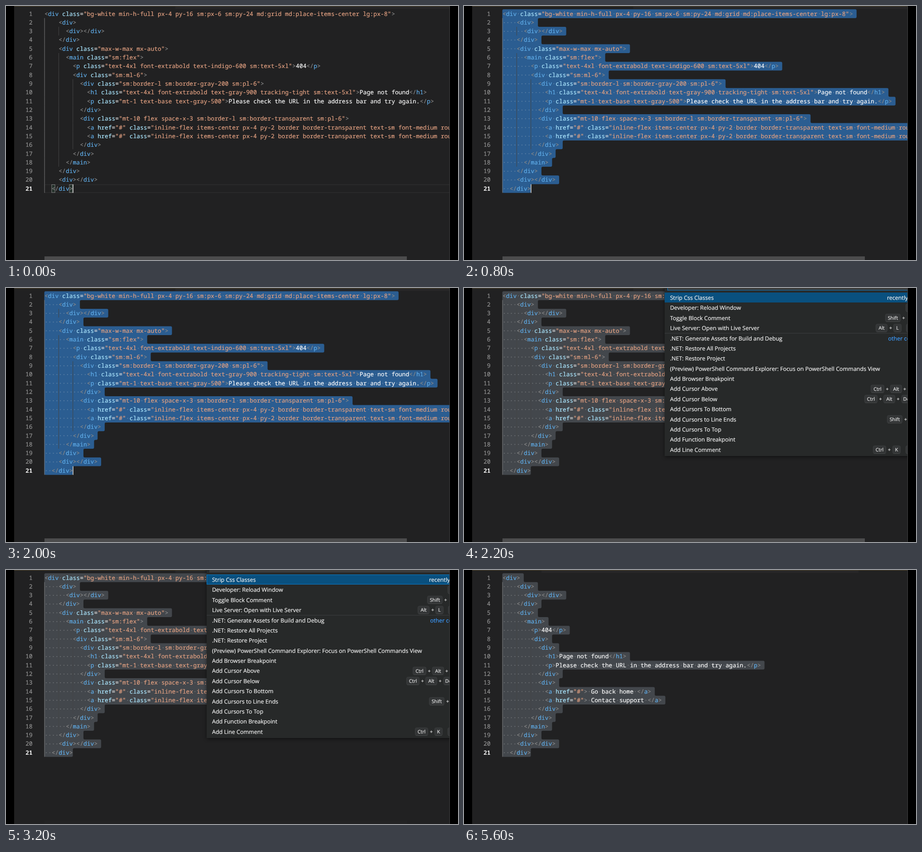
Recreate the animation shown at these times as an HTML page. Size 998x561 px, loop 5.8 s.

```html
<!DOCTYPE html>
<html lang="en">
<head>
<meta charset="utf-8">
<title>Strip classes in an editor</title>
<style>
  html, body { margin: 0; width: 100%; height: 100%; overflow: hidden; background: #000; }
  svg { display: block; width: 998px; height: 561px; }
  text {
    text-rendering: geometricPrecision; white-space: pre;
    fill: currentColor; stroke: currentColor; stroke-width: 0.22px;
  }
  .code { font: 13.03px "Noto Sans Mono", "DejaVu Sans Mono", monospace; font-variant-ligatures: none; }
  .menu { font: 12.5px "Open Sans", "Noto Sans", sans-serif; color: #f4f4f4; }
  .key { font-size: 10.7px; color: #e6e6e6; }
  .punct { color: #8a8a8a; }
  .tag { color: #60ade9; }
  .attr { color: #abe6ff; }
  .eq { color: #e4e4e4; }
  .str { color: #e2a081; }
  .plain { color: #fafafa; }
  .num { color: #929292; text-anchor: end; }
  .num.on { color: #f4f4f4; font-weight: 700; stroke: none; }
</style>
</head>
<body>
<svg id="stage" viewBox="0 0 998 561">
  <defs>
    <clipPath id="pane"><rect x="18" y="0" width="961.5" height="561"/></clipPath>
    <filter id="soft" x="-10%" y="-10%" width="120%" height="120%"><feGaussianBlur stdDeviation="4"/></filter>
  </defs>
</svg>
<script>
const LOOP = 5800;
const LEFT = 85, TOP = 7.35, CELL = 7.818, ROW = 19.31;

const button = 'inline-flex items-center px-4 py-2 border border-transparent text-sm font-medium rounded-md shadow-sm';
const markup = `<div class="bg-white min-h-full px-4 py-16 sm:px-6 sm:py-24 md:grid md:place-items-center lg:px-8">
    <div>
      <div></div>
    </div>
    <div class="max-w-max mx-auto">
      <main class="sm:flex">
        <p class="text-4xl font-extrabold text-indigo-600 sm:text-5xl">404</p>
        <div class="sm:ml-6">
          <div class="sm:border-l sm:border-gray-200 sm:pl-6">
            <h1 class="text-4xl font-extrabold text-gray-900 tracking-tight sm:text-5xl">Page not found</h1>
            <p class="mt-1 text-base text-gray-500">Please check the URL in the address bar and try again.</p>
          </div>
          <div class="mt-10 flex space-x-3 sm:border-l sm:border-transparent sm:pl-6">
            <a href="#" class="${button}"> Go back home </a>
            <a href="#" class="${button}"> Contact support </a>
          </div>
        </div>
      </main>
    </div>
    <div></div>
  </div>`;
const stripped = markup.replace(/ class="[^"]*"/g, '');

function el(parent, tag, attrs = {}, text) {
  const node = document.createElementNS('http://www.w3.org/2000/svg', tag);
  for (const k in attrs) node.setAttribute(k, attrs[k]);
  if (text !== undefined) node.textContent = text;
  parent.append(node);
  return node;
}
const rect = (parent, x, y, width, height, fill, more) =>
  el(parent, 'rect', { x, y, width, height, fill, ...more });
const show = (node, on) => node.setAttribute('visibility', on ? 'visible' : 'hidden');

const colX = c => LEFT + c * CELL;
const rowY = r => TOP + r * ROW;
const baseY = r => rowY(r) + 14.2;

// Closed outline with every corner rounded, inward ones too.
function roundPath(points, radius) {
  const toward = (a, b) => {
    const len = Math.hypot(b[0] - a[0], b[1] - a[1]);
    const k = Math.min(radius, len / 2) / len;
    return [a[0] + (b[0] - a[0]) * k, a[1] + (b[1] - a[1]) * k];
  };
  const n = points.length;
  return points.map((p, i) => {
    const a = toward(p, points[(i + n - 1) % n]);
    const b = toward(p, points[(i + 1) % n]);
    return `${i ? 'L' : 'M'}${a}Q${p} ${b}`;
  }).join('') + 'Z';
}

function selectionPath(lines) {
  const last = lines.length - 1;
  const left = LEFT - 0.4;
  const ends = lines.map((s, i) => colX(s.length + (i < last ? 1 : 0)));
  const pts = [[left, rowY(0)], [ends[0], rowY(0)]];
  for (let i = 0; i < last; i++) {
    if (Math.abs(ends[i] - ends[i + 1]) < 0.1 || Math.min(ends[i], ends[i + 1]) > 990) continue;
    pts.push([ends[i], rowY(i + 1)], [ends[i + 1], rowY(i + 1)]);
  }
  pts.push([ends[last], rowY(last + 1)], [left, rowY(last + 1)]);
  return roundPath(pts, 3);
}

function drawLine(parent, line, row) {
  const put = (kind, text, at) =>
    el(parent, 'text', { class: kind, x: colX(at), y: baseY(row) }, text);
  const parts = /(<\/?)(\w+)|(\w+)(=)("[^"]*")|(>)|([^<>\s]+)/g;
  const kinds = ['punct', 'tag', 'attr', 'eq', 'str', 'punct', 'plain'];
  for (const m of line.matchAll(parts)) {
    let at = m.index;
    m.slice(1).forEach((text, i) => {
      if (!text) return;
      put(kinds[i], text, at);
      at += text.length;
    });
  }
}

function buildCode(parent, source) {
  const lines = source.split('\n');
  const group = el(parent, 'g', { class: 'code' });
  const sel = el(group, 'path', { d: selectionPath(lines) });
  const guides = el(group, 'g');
  const dots = el(group, 'g', { fill: '#e3e4e2', 'fill-opacity': 0.3 });
  lines.forEach((line, r) => {
    const indent = line.search(/\S/);
    for (let c = 0; c < indent; c += 4)
      rect(guides, colX(c) - 0.4, rowY(r), 1, ROW, c ? '#444546' : '#7c7c7c');
    [...line].forEach((ch, c) => {
      if (ch === ' ' && colX(c) < 980)
        el(dots, 'circle', { cx: colX(c + 0.5), cy: rowY(r) + 10, r: 1 });
    });
    drawLine(group, line, r);
  });
  return { group, sel, dots };
}

function buildKeys(parent, y, keys) {
  for (const [label, x, w] of keys) {
    if (w) {
      rect(parent, x + 0.5, y - 8.5, w - 1, 17, '#333536', { rx: 3, stroke: '#3c3e3f' });
      rect(parent, x + 2, y + 8, w - 4, 1, '#454748');
    }
    el(parent, 'text', { class: 'key', x: x + w / 2, y: y + 3.9, 'text-anchor': 'middle' }, label);
  }
}

function buildMenu(parent) {
  const items = ['Strip Css Classes', 'Developer: Reload Window', 'Toggle Block Comment',
    'Live Server: Open with Live Server', '.NET: Generate Assets for Build and Debug',
    '.NET: Restore All Projects', '.NET: Restore Project',
    '(Preview) PowerShell Command Explorer: Focus on PowerShell Commands View',
    'Add Browser Breakpoint', 'Add Cursor Above', 'Add Cursor Below', 'Add Cursors To Bottom',
    'Add Cursors to Line Ends', 'Add Cursors To Top', 'Add Function Breakpoint', 'Add Line Comment'];
  // label, left edge, width (0 for a bare sign)
  const keys = {
    1: [['', 975, 30]],
    2: [['Shift', 930, 34], ['+', 970.5, 0], ['', 979, 30]],
    3: [['Alt', 909, 26], ['+', 942, 0], ['L', 948, 18], ['', 976, 30]],
    9: [['Ctrl', 898, 30], ['+', 934.5, 0], ['Alt', 941, 26], ['+', 973, 0]],
    10: [['Ctrl', 884, 29], ['+', 919.5, 0], ['Alt', 926, 26], ['+', 958.5, 0], ['DownArrow', 966, 66]],
    12: [['Shift', 934, 34], ['+', 975, 0]],
    15: [['Ctrl', 903, 29], ['+', 939, 0], ['K', 946, 18], ['', 975, 30]]
  };
  const group = el(parent, 'g', { class: 'menu' });
  rect(group, 443, -20, 600, 393, '#000', { opacity: 0.5, filter: 'url(#soft)' });
  rect(group, 443, -5, 600, 376, '#272929');
  rect(group, 449, -5, 600, 10.5, '#3b3c3c');
  const input = rect(group, 449.5, -5, 600, 10, 'none', { stroke: '#0a78c4' });
  rect(group, 443, 10, 600, 22, '#09507f');
  const focus = rect(group, 443.5, 10.5, 600, 21, 'none', { stroke: '#0a7dcb' });
  rect(group, 443, 99.5, 600, 1, '#3f4142');
  items.forEach((label, i) => {
    const y = 21.1 + i * 22.4 + (i === 4 ? 1 : 0);
    el(group, 'text', { x: 455, y: y + 4.6 }, label);
    if (keys[i]) buildKeys(group, y, keys[i]);
  });
  el(group, 'text', { x: 934, y: 25.7 }, 'recently used');
  el(group, 'text', { x: 936.5, y: 116.3, style: 'color:#3d9cff' }, 'other commands');
  return { group, input, focus };
}

const stage = document.getElementById('stage');
const pane = el(stage, 'g', { 'clip-path': 'url(#pane)' });
rect(pane, 18, 0, 962, 561, '#212122');
const strip = rect(pane, 374, 1, 700, 5.5, '#272728');
rect(pane, 18, 0, 962, 1, '#51462c');

const numbers = el(pane, 'g', { class: 'code' });
for (let i = 0; i < 21; i++)
  el(numbers, 'text', { class: i === 20 ? 'num on' : 'num', x: 58.5, y: baseY(i) }, i + 1);

const current = el(pane, 'g');
for (const y of [393.8, 411.3]) rect(current, LEFT, y, 900, 1.6, '#2d2d2e');
for (const c of [2, 7])
  rect(current, colX(c) + 0.2, 394.5, CELL - 0.6, 17.5, '#24302a', { stroke: '#858585' });

const codes = [markup, stripped].map(s => buildCode(pane, s));
const caret = rect(pane, 147.3, 393.8, 1.4, 19, '#e8e8e6');
const bar = rect(pane, LEFT, 553, 800, 8, '#4c4c4d');
const menu = buildMenu(pane);
rect(stage, 979, 0, 1, 561, '#454546');

// start ms, code, selection (0 none, 1 active, 2 idle), caret, menu (1 typing, 2 clicked), scrollbar
const steps = [
  [0, 0, 0, 1, 0, 1],
  [400, 0, 0, 0, 0, 1],
  [800, 0, 1, 1, 0, 1],
  [1400, 0, 1, 0, 0, 1],
  [1800, 0, 1, 1, 0, 1],
  [2200, 0, 2, 0, 1, 1],
  [2800, 0, 2, 0, 1, 0.5],
  [3000, 0, 2, 0, 1, 0.06],
  [3200, 0, 2, 0, 2, 0.06],
  [3400, 0, 2, 0, 0, 0],
  [3600, 1, 2, 0, 0, 0]
];
const selFill = ['none', '#2b5d91', '#43474c'];
let shown = null;

function render(t) {
  const step = steps.findLast(s => s[0] <= t);
  if (step === shown) return;
  shown = step;
  const [, code, sel, caretOn, menuMode, barAlpha] = step;
  codes.forEach((c, i) => {
    c.group.setAttribute('display', i === code ? 'inline' : 'none');
    c.sel.setAttribute('fill', selFill[sel]);
    show(c.dots, sel > 0);
  });
  strip.setAttribute('x', code ? 171 : 374);
  show(current, sel === 0);
  show(caret, caretOn);
  bar.setAttribute('opacity', barAlpha);
  menu.group.setAttribute('display', menuMode ? 'inline' : 'none');
  show(menu.input, menuMode === 1);
  show(menu.focus, menuMode === 2);
}

const start = performance.now();
function tick() {
  render((performance.now() - start) % LOOP);
  requestAnimationFrame(tick);
}
tick();
</script>
</body>
</html>
```
